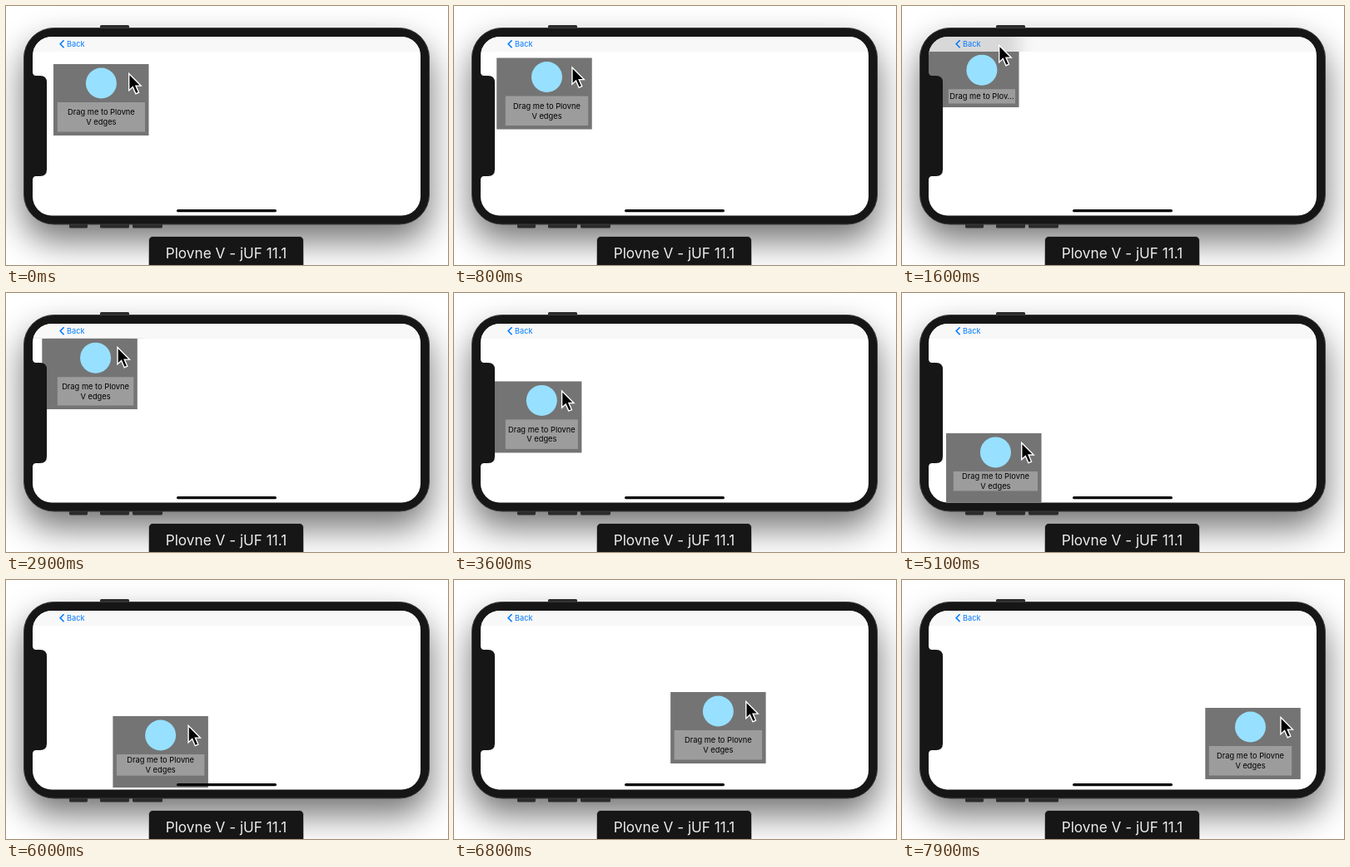
These frames come from a looping animation (531x312 px, 8000 ms). An HTML page:

```html
<!DOCTYPE html>
<html lang="en">
<head>
<meta charset="utf-8">
<title>Safe area drag</title>
<style>
  html, body { margin: 0; width: 100%; height: 100%; overflow: hidden; background: #fff; }
  svg { display: block; width: 531px; height: 312px; }
  text { font-family: Inter, Roboto, "Liberation Sans", sans-serif; }
</style>
</head>
<body>
<svg viewBox="0 0 531 312" xmlns="http://www.w3.org/2000/svg">
  <defs>
    <filter id="shadow" x="-30%" y="-50%" width="160%" height="200%"><feGaussianBlur stdDeviation="21"/></filter>
    <filter id="smear" x="-50%" y="-10%" width="200%" height="120%"><feGaussianBlur stdDeviation="10 0"/></filter>
    <clipPath id="screen"><rect x="32" y="37" width="466" height="215.5" rx="23"/></clipPath>
    <clipPath id="bar"><rect x="32" y="37" width="466" height="18"/></clipPath>
  </defs>

  <rect width="531" height="312" fill="#fff"/>
  <rect x="21" y="46" width="488" height="237" rx="36" opacity=".55" filter="url(#shadow)"/>

  <g fill="#2b2b2b">
    <rect x="113" y="23" width="35" height="8" rx="1.5"/>
    <rect x="76" y="258" width="22" height="9.5" rx="1.5"/>
    <rect x="113" y="258" width="35" height="9.5" rx="1.5"/>
    <rect x="152" y="258" width="36" height="9.5" rx="1.5"/>
  </g>
  <rect x="21.5" y="26.5" width="487" height="236.5" rx="36" fill="#161616" stroke="#3c3c3c"/>
  <rect x="32" y="37" width="466" height="215.5" rx="23" fill="#fff"/>

  <g clip-path="url(#screen)">
    <rect id="card" width="114.5" height="86" fill="#747474"/>
    <rect id="label" fill="#9c9c9c"/>
    <circle id="dot" r="18.5" fill="#97e0ff"/>
    <g font-size="9.3" text-anchor="middle" fill="#000">
      <text id="line1"></text>
      <text id="line2"></text>
    </g>
    <g clip-path="url(#bar)">
      <rect x="32" y="37" width="466" height="18" fill="#f8f8f8"/>
      <rect id="tint" fill="#747474" opacity=".24" filter="url(#smear)"/>
    </g>
  </g>
  <path d="M31 80H32Q32.5 84 36 84H41Q49 84 49 92V197Q49 205 41 205H36Q32.5 205 32 209H31Z" fill="#161616"/>
  <path d="M69.6 41.3L65.2 45.8L69.6 50.3" fill="none" stroke="#007aff" stroke-width="1.6"/>
  <text x="73" y="49" font-size="9.2" fill="#007aff">Back</text>
  <rect x="205" y="245" width="120" height="3.2" rx="1.6" fill="#000"/>

  <rect x="171.5" y="277.5" width="186" height="45" rx="5" fill="#161616" stroke="#c4c4c4" stroke-opacity=".6"/>
  <text x="264.5" y="303.5" font-size="17.2" text-anchor="middle" fill="#ececec">Plovne V - jUF 11.1</text>

  <path id="cursor" d="M0 0V20.2L4.6 16L8.2 24.2L11.8 22.6L8.3 14.6H14.4Z" fill="#000" stroke="#fff" stroke-width="1.4"/>
</svg>

<script>
const LOOP = 8000;
// time, card x, card y
const KEYS = [
  [0, 57, 70], [900, 50, 61], [1600, 26, 36], [2900, 43.3, 54],
  [4500, 32.5, 170], [6000, 128.3, 164], [6800, 260, 135], [7900, 364.3, 154]
];
const CARD = { w: 114.5, h: 86 };
const SAFE = { left: 57.3, top: 55.2, right: 472.7, bottom: 240.2 };
const PAD = 4.5, RADIUS = 18.5, LINE = 11.65;
const WORDS = "Drag me to Plovne V edges";

const el = id => document.getElementById(id);
const clamp = (v, max) => Math.max(0, Math.min(max, v));
const set = (id, attrs) => {
  for (const name in attrs) el(id).setAttribute(name, attrs[name]);
};

const pen = document.createElement("canvas").getContext("2d");
pen.font = '9.3px Inter, Roboto, "Liberation Sans", sans-serif';
const widthOf = s => pen.measureText(s).width;

// Smooth path that never overshoots its keys
function slope(i, axis) {
  if (i === 0 || i === KEYS.length - 1) return 0;
  const rate = k => (KEYS[k + 1][axis] - KEYS[k][axis]) / (KEYS[k + 1][0] - KEYS[k][0]);
  const a = rate(i - 1), b = rate(i);
  return a * b <= 0 ? 0 : 2 * a * b / (a + b);
}

function at(t, axis) {
  const last = KEYS.length - 1;
  if (t >= KEYS[last][0]) return KEYS[last][axis];
  const i = KEYS.findIndex(k => k[0] > t) - 1;
  const [p, q] = [KEYS[i], KEYS[i + 1]];
  const span = q[0] - p[0], u = (t - p[0]) / span;
  const ease = u * u * (3 - 2 * u);
  return p[axis] + (q[axis] - p[axis]) * ease
    + span * (slope(i, axis) * u * (1 - u) ** 2 - slope(i + 1, axis) * u * u * (1 - u));
}

function wrap(width, height) {
  if (height < 22) {
    let text = WORDS;
    while (widthOf(text + "…") > width + 1.5) text = text.slice(0, -1);
    return [text.trim() + "…"];
  }
  return width < 82.5
    ? ["Drag me to", "Plovne V edges"]
    : ["Drag me to Plovne", "V edges"];
}

function draw(t) {
  const x = at(t, 1), y = at(t, 2);
  const left = x + clamp(SAFE.left - x, 25.3);
  const top = y + clamp(SAFE.top - y, 18.2);
  const right = x + CARD.w - clamp(x + CARD.w - SAFE.right, 25.3);
  const bottom = y + CARD.h - clamp(y + CARD.h - SAFE.bottom, 12);

  const mid = (left + right) / 2;
  const labelTop = top + 2 * (PAD + RADIUS);
  const width = right - left - 2 * PAD;
  const height = bottom - PAD - labelTop;

  set("card", { x, y });
  set("dot", { cx: mid, cy: top + PAD + RADIUS });
  set("label", { x: left + PAD, y: labelTop, width, height });

  const lines = wrap(width, height);
  const base = labelTop + height / 2 + 3.4 - (lines.length - 1) * LINE / 2;
  ["line1", "line2"].forEach((id, i) => {
    set(id, { x: mid, y: base + i * LINE });
    el(id).textContent = lines[i] || "";
  });

  const spill = x <= 32 ? 30 : 0;
  set("tint", { x: x - spill, y, width: CARD.w + spill, height: Math.max(0, 55 - y) });
  set("cursor", { transform: `translate(${x + 90.7} ${y + 11.5})` });
}

const start = performance.now();
function tick() {
  draw((performance.now() - start) % LOOP);
  requestAnimationFrame(tick);
}
tick();
</script>
</body>
</html>
```
